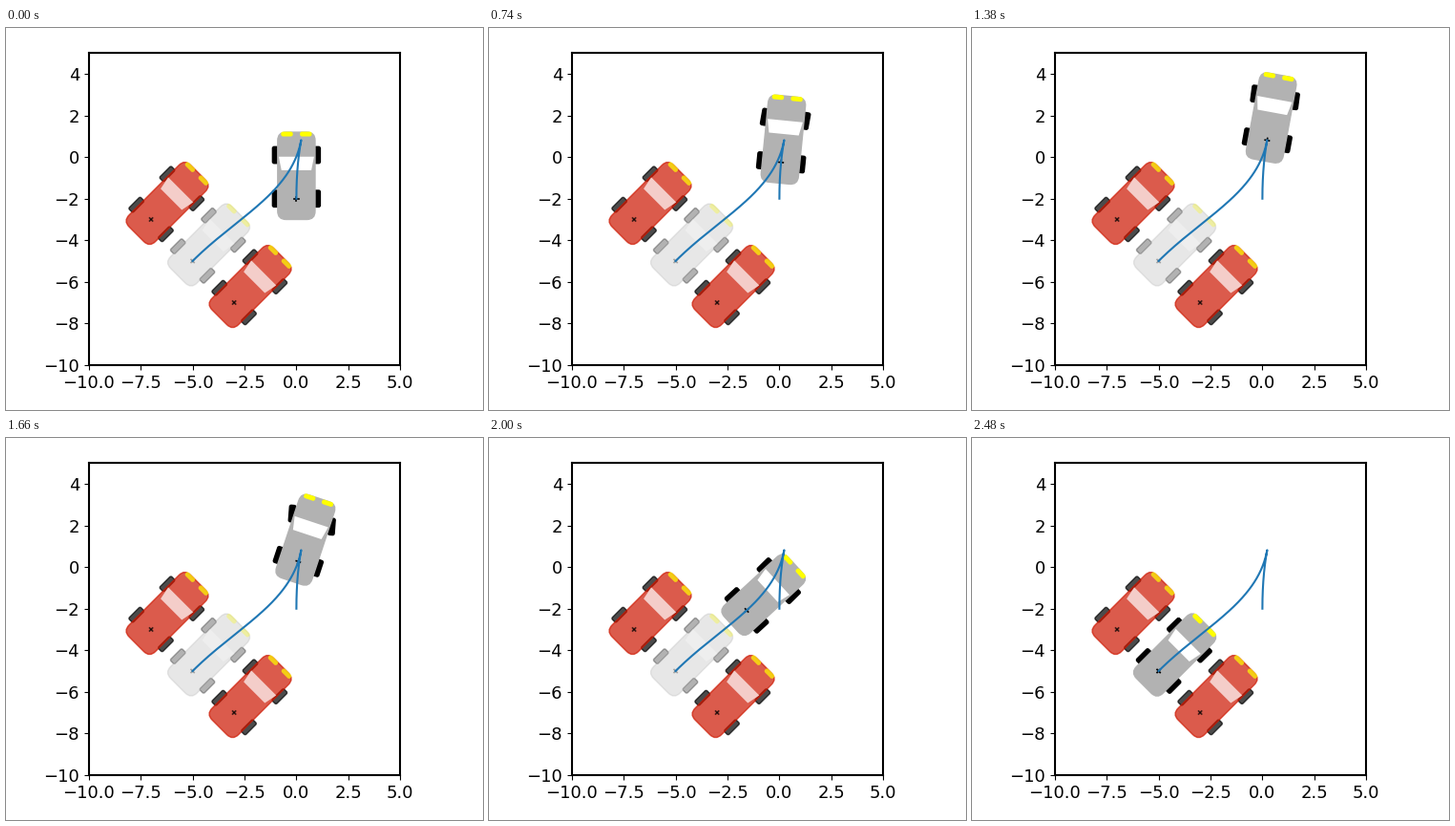
Animation, 500 px wide and 400 px high, one loop 2.5 s. Source, as a matplotlib script:

```python
import numpy as np
import matplotlib.pyplot as plt
from matplotlib.animation import FuncAnimation
from matplotlib.lines import Line2D
from matplotlib.patches import FancyBboxPatch, Polygon
from matplotlib.transforms import Affine2D

W, H, DPI = 500, 400, 100
FRAMES, INTERVAL = 125, 20
WHEELBASE = 2.1
GRAY, RED = "#b2b2b2", "#cd1600"

plt.rcParams.update({"font.family": "DejaVu Sans", "font.size": 13,
                     "axes.linewidth": 1.5})
fig = plt.figure(figsize=(W / DPI, H / DPI), dpi=DPI, facecolor="white")
LEFT, BOTTOM, SIDE = 86.8, 47.2, 326.4
ax = fig.add_axes([LEFT / W, BOTTOM / H, SIDE / W, SIDE / H])
ax.set_xlim(-10, 5)
ax.set_ylim(-10, 5)
ax.set_xticks(np.arange(-10, 5.1, 2.5))
ax.set_yticks(range(-10, 5, 2))


class Car:
    """A car in local coordinates: x forward, origin on the rear axle."""

    def __init__(self, color, alpha=1.0):
        self.alpha = alpha
        self.pose = Affine2D()
        self.wheels = []
        for x in (0, WHEELBASE):
            for y in (-1, 1):
                turn = Affine2D()
                self.box(x, y, 0.8, 0.3, 0.08, "black", 1, turn)
                if x:
                    self.wheels.append((turn, x, y))
        self.box(1.1, 0, 4.2, 1.8, 0.4, color, 1)
        screen = [(2.02, 0.85), (2.02, -0.85), (1.37, -0.72), (1.37, 0.72)]
        self.add(Polygon(screen, fc="white", ec="none", alpha=alpha))
        for y in (-0.455, 0.455):
            self.box(3.11, y, 0.23, 0.57, 0.1, "yellow", 0)
        arm = 0.1
        for xs, ys in (([-arm, arm], [0, 0]), ([0, 0], [-arm, arm])):
            line = Line2D(xs, ys, color="black", lw=1.2, alpha=alpha)
            line.set_transform(self.pose + ax.transData)
            ax.add_line(line)

    def add(self, patch, local=None):
        to_world = self.pose + ax.transData
        patch.set_transform(local + to_world if local else to_world)
        ax.add_artist(patch)

    def box(self, x, y, length, width, radius, color, lw, local=None):
        style = f"round,pad=0,rounding_size={radius}"
        self.add(FancyBboxPatch((x - length / 2, y - width / 2), length, width,
                                boxstyle=style, fc=color,
                                ec=color if lw else "none", lw=lw,
                                alpha=self.alpha), local)

    def place(self, x, y, heading, steer=0.0):
        self.pose.clear().rotate(heading).translate(x, y)
        for turn, wx, wy in self.wheels:
            turn.clear().rotate_around(wx, wy, steer)


def bezier(p0, p1, p2, p3, n=400):
    """Points and tangents of a cubic curve."""
    t = np.linspace(0, 1, n)[:, None]
    u = 1 - t
    pts = u**3 * p0 + 3 * u**2 * t * p1 + 3 * u * t**2 * p2 + t**3 * p3
    tan = u**2 * (p1 - p0) + 2 * u * t * (p2 - p1) + t**2 * (p3 - p2)
    return pts, tan


def unit(deg):
    return np.array([np.cos(np.radians(deg)), np.sin(np.radians(deg))])


def length_of(pts):
    return np.r_[0, np.cumsum(np.hypot(*np.diff(pts, axis=0).T))]


def hermite(t, knots):
    """Cubic interpolation through (time, value, slope) knots."""
    ts = [k[0] for k in knots]
    i = int(np.clip(np.searchsorted(ts, t, side="right") - 1, 0, len(ts) - 2))
    (t0, a, va), (t1, b, vb) = knots[i:i + 2]
    h = t1 - t0
    u = (t - t0) / h
    return (a * (1 + 2 * u) * (1 - u)**2 + va * h * u * (1 - u)**2
            + b * u**2 * (3 - 2 * u) + vb * h * u**2 * (u - 1))


# Drive forward to the turning point, then reverse into the gap.
start, turn_pt, goal = np.array([[0, -2], [0.23, 0.82], [-5, -5]])
TILT = 79.5
ahead, ahead_tan = bezier(start, start + 0.94 * unit(90),
                          turn_pt - 0.94 * unit(TILT), turn_pt)
back, back_tan = bezier(turn_pt, turn_pt - 2.6 * unit(TILT),
                        goal + 3 * unit(45), goal)
path = np.vstack([ahead, back])
facing = np.vstack([ahead_tan, -back_tan])
heading = np.arctan2(facing[:, 1], facing[:, 0])
dist = length_of(path)
D1 = dist[len(ahead) - 1]

TRAVEL = [(0, 0, 1.0), (0.32, 0.59, 2.6), (0.54, 1.21, 2.8),
          (0.74, 1.75, 2.6), (1.08, 2.46, 1.75), (1.44, D1, 0),
          (1.66, D1 + 0.57, 5.2), (2.0, D1 + 3.48, 10.9),
          (2.16, D1 + 5.2, 10.3), (2.48, dist[-1], 6.5)]
STEER_T = [0, 0.32, 0.74, 1.08, 1.3, 1.44, 1.66, 1.78, 1.86, 2.0, 2.2, 2.48]
STEER_DEG = [0, -2.5, -4.5, -4, 0, 5, 14, 26, 24, 2, -4, -1]

for x, y in ((-7, -3), (-3, -7)):
    Car(RED, 0.7).place(x, y, np.pi / 4)
Car(GRAY, 0.3).place(*goal, np.pi / 4)
car = Car(GRAY)
ax.plot(*path.T, color="C0", lw=1.5, zorder=3)


def update(i):
    t = i * INTERVAL / 1000
    d = hermite(t, TRAVEL)
    x, y, angle = (np.interp(d, dist, v) for v in (*path.T, heading))
    car.place(x, y, angle, np.radians(np.interp(t, STEER_T, STEER_DEG)))
    return []


anim = FuncAnimation(fig, update, frames=FRAMES, interval=INTERVAL,
                     init_func=lambda: update(0), repeat=True, repeat_delay=0)
plt.show()
```
